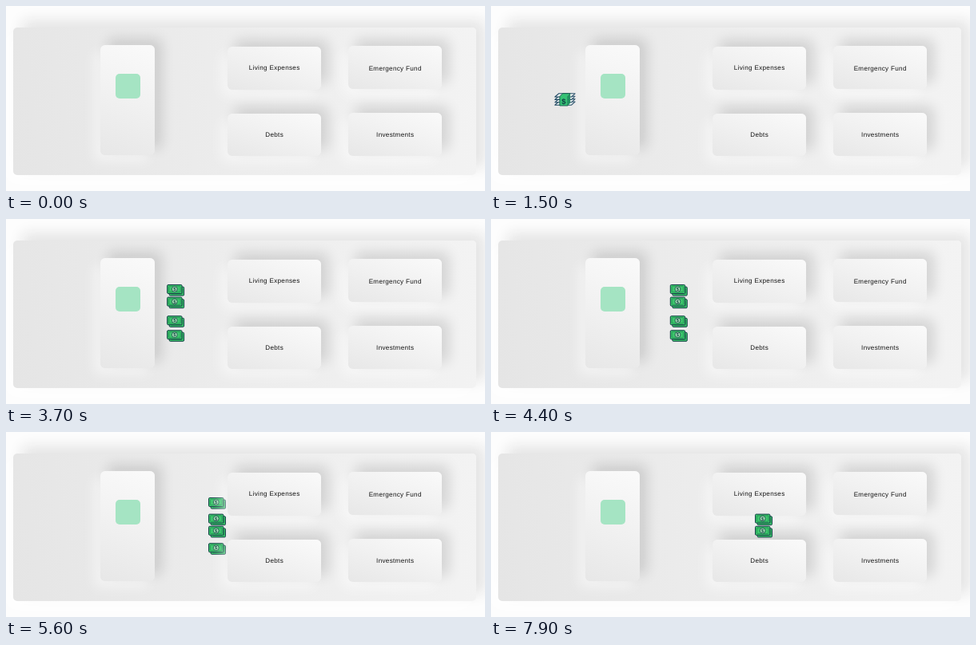
Recreate the animation shown at these times as an HTML page. Size 599 px wide and 232 px high, loop 8 s.

```html
<!DOCTYPE html>
<html lang="en">
<head>
<meta charset="utf-8">
<title>Income split</title>
<style>
  html, body { margin: 0; width: 100%; height: 100%; overflow: hidden; background: #fff; }
  #stage { position: relative; width: 599px; height: 232px; overflow: hidden; background: #fdfdfd; }
  #stage div, #stage > svg { position: absolute; }
  #stage > svg { left: 0; top: 0; }
  .panel {
    left: 9px; top: 27px; width: 579px; height: 185px; border-radius: 5px;
    background: linear-gradient(80deg, #e5e5e5, #ededed 50%, #f3f3f3);
    box-shadow: 11px -9px 18px #e4e4e4, -8px 8px 18px #fff;
  }
  .card {
    border-radius: 6px;
    background: linear-gradient(200deg, #fafafa, #f1f1f1 50%, #e7e7e7);
    box-shadow: 9px -8px 16px rgba(0, 0, 0, .125), -8px 8px 16px rgba(255, 255, 255, .5);
  }
  .badge { left: 136.5px; top: 85px; width: 31px; height: 31px; border-radius: 5px; background: #a5e4c3; }
  text { font-family: "Liberation Sans", Arial, sans-serif; text-anchor: middle; text-rendering: geometricPrecision; }
  .label { font-size: 8.1px; letter-spacing: .32px; fill: #141414; }
</style>
</head>
<body>
<div id="stage">
  <div class="panel"></div>
  <svg width="599" height="232">
    <defs>
      <g id="note">
        <rect x=".5" y=".5" width="18.4" height="11" rx="1.2" fill="#3cc56c" stroke="#173f48" stroke-width="1"/>
        <rect x="2.4" y="2.3" width="14.6" height="7.4" rx="1" fill="none" stroke="#1d8a4e" stroke-width=".7"/>
      </g>
      <g id="bill">
        <use href="#note" x="2.6" y="2.6"/>
        <use href="#note"/>
        <circle cx="9.7" cy="6" r="3.4" fill="#a9ecb8" stroke="#173f48" stroke-width=".8"/>
        <text x="9.7" y="8.2" font-size="6" font-weight="700" fill="#173f48">$</text>
      </g>
      <path id="sheet" d="M5.5 .8H26L21.5 5H.8Z" fill="#e6eeee" stroke="#1d4560" stroke-width="1.1" stroke-linejoin="round"/>
      <g id="stack">
        <use href="#sheet" y="10.2"/>
        <use href="#sheet" y="6.8"/>
        <use href="#sheet" y="3.4"/>
        <use href="#sheet"/>
        <path d="M10.5 .7H20L17 4.6V16H6.8V4.6Z" fill="#35c274" stroke="#12524a" stroke-width=".9" stroke-linejoin="round"/>
        <path d="M17 4.6L20 .9V12.6L17 16Z" fill="#1b8f5c"/>
        <text x="11.9" y="13.6" font-size="9.5" font-weight="700" fill="#103b45">$</text>
      </g>
    </defs>
    <use id="pile" href="#stack"/>
    <g id="outer"></g>
  </svg>
</div>
<script>
const stage = document.getElementById("stage");
const pile = document.getElementById("pile");
const outer = document.getElementById("outer");

function svg(name, attrs, parent) {
  const el = document.createElementNS("http://www.w3.org/2000/svg", name);
  for (const key in attrs) el.setAttribute(key, attrs[key]);
  parent.append(el);
  return el;
}

function addDiv(type, style = "") {
  const el = document.createElement("div");
  el.className = type;
  el.style.cssText = style;
  stage.append(el);
}

const addCard = (x, y, w, h) =>
  addDiv("card", `left:${x}px;top:${y}px;width:${w}px;height:${h}px`);
const addLayer = () => svg("svg", { width: 599, height: 232 }, stage);

function addBill(layer, y, drift) {
  return { el: svg("use", { href: "#bill" }, layer), y, drift };
}

// Outer bills pass under the right-hand cards, inner ones run between them.
function addTarget(x, y, name, baseline) {
  addCard(x, y, 117, 53.5);
  const label = { class: "label", x: x + 58.7, y: baseline };
  svg("text", label, addLayer()).textContent = name;
}
addTarget(277, 51, "Living Expenses", 79.5);
addTarget(428, 50, "Emergency Fund", 80.6);
addTarget(277, 134.7, "Debts", 163.5);
addTarget(428, 134, "Investments", 163.5);

const inner = addLayer();
addCard(118, 49, 68, 137.5);
addDiv("badge");

const bills = [
  addBill(outer, 82, 0),
  addBill(inner, 97.6, 5),
  addBill(inner, 121.2, -3.4),
  addBill(outer, 139.2, 0)
];

const clamp = v => Math.max(0, Math.min(1, v));

// Movement rests on every fourth tick of 100 ms.
const moves = (tick, phase) => tick - Math.floor((tick + phase) / 4);

// Right edge of the bills: out of the card, slowly to the gap, quickly through it.
const path = [[21, 191.4], [33, 245.8], [50, 301], [59, 352]];

function along(points, n) {
  return points.slice(1).reduce((value, [end, to], i) => {
    const [begin, from] = points[i];
    return value + (to - from) * clamp((n - begin) / (end - begin));
  }, points[0][1]);
}

function place(el, x, y) {
  el.setAttribute("transform", `translate(${x} ${y})`);
}

function draw(ms) {
  const tick = Math.floor(ms % 8000 / 100);
  place(pile, 27.2 + 4.72 * moves(tick, 2), 109);
  pile.setAttribute("opacity", tick < 28 ? clamp(tick / 3) : 0);

  const n = moves(tick, 1);
  const x = along(path, n) - 22;
  const shift = clamp((n - 33) / 8);
  for (const { el, y, drift } of bills) {
    place(el, x, y + drift * shift);
    el.setAttribute("opacity", clamp((tick - 26) / 6));
  }
}

const start = performance.now();
function frame() {
  draw(performance.now() - start);
  requestAnimationFrame(frame);
}
draw(0);
requestAnimationFrame(frame);
</script>
</body>
</html>
```
